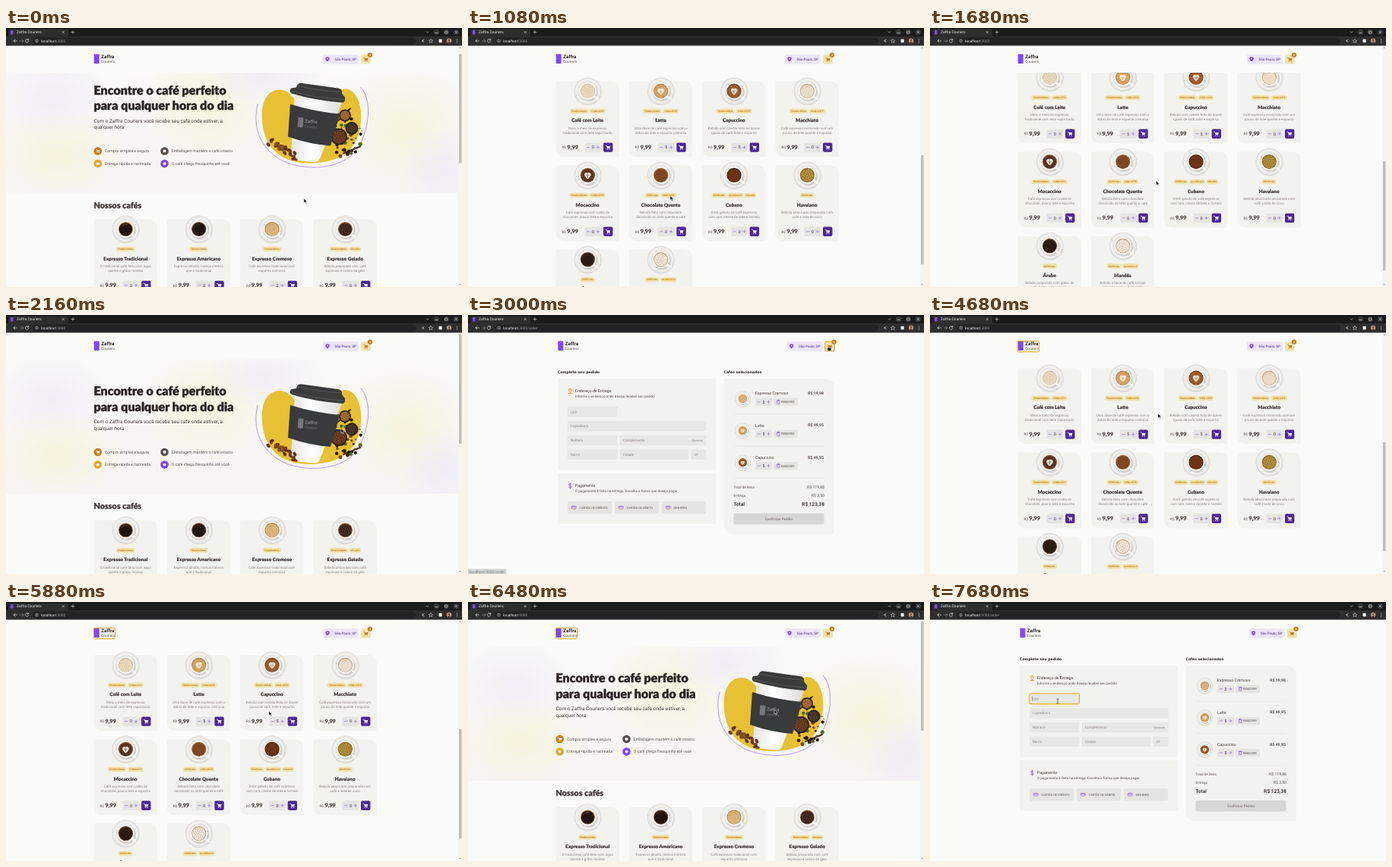
These frames come from a looping animation (600x342 px, 8 s). An HTML page:

```html
<!DOCTYPE html>
<html lang="pt">
<head>
<meta charset="utf-8">
<title>Zaffra Couriers</title>
<style>
html, body { margin: 0; width: 100%; height: 100%; overflow: hidden; background: #fafaf8; }
svg { display: block; width: 600px; height: 342px; font-family: Roboto, sans-serif; text-rendering: geometricPrecision; }
text { white-space: pre; }
.title { font-family: Lato, sans-serif; font-weight: 900; stroke: currentColor; stroke-width: .025em; }
.head { font-family: 'DejaVu Sans', sans-serif; font-weight: 700; }
.bold { font-weight: 700; }
.mid { text-anchor: middle; }
.end { text-anchor: end; }
</style>
</head>
<body>
<svg id="stage" viewBox="0 0 600 342"></svg>
<script>
const PURPLE = '#8047f8', DEEP = '#4b2995', GOLD = '#dbac2c', AMBER = '#c47f17';
const INK = '#272221', BODY = '#574f4d', SOFT = '#8d8686', PANEL = '#f2f2ee', FIELD = '#e7e7e3';

const text = (x, y, size, fill, str, cls = '') =>
  `<text x="${x}" y="${y}" font-size="${size}" fill="${fill}" color="${fill}" class="${cls}">${str}</text>`;
const rect = (x, y, w, h, fill, r = 0, more = '') =>
  `<rect x="${x}" y="${y}" width="${w}" height="${h}" rx="${r}" fill="${fill}" ${more}/>`;
const circle = (x, y, r, fill, more = '') => `<circle cx="${x}" cy="${y}" r="${r}" fill="${fill}" ${more}/>`;
const path = (d, fill, more = '') => `<path d="${d}" fill="${fill}" ${more}/>`;
const line = (d, color, w = .6, more = '') =>
  path(d, 'none', `stroke="${color}" stroke-width="${w}" stroke-linecap="round" stroke-linejoin="round" ${more}`);
const group = (x, y, inner, more = '') => `<g transform="translate(${x} ${y})" ${more}>${inner}</g>`;
const times = (n, f) => Array.from({ length: n }, (_, i) => f(i)).join('');
const noise = i => (Math.sin(i * 12.9898) * 43758.5453 % 1 + 1) % 1;

// Panel with two large opposite corners
const leaf = (x, y, w, h, r) =>
  path(`M${x + 2} ${y}h${w - r - 2}q${r} 0 ${r} ${r}v${h - r - 2}q0 2 -2 2h${2 + r - w}q${-r} 0 ${-r} ${-r}v${2 + r - h}q0 -2 2 -2`, PANEL);
const cartIcon = (x, y, color) => group(x, y,
  line('M-3 -2.4h1.2l.4 1', color, .7) + path('M-1.7 -1.6h4.9l-.8 3h-3.5z', color) +
  circle(-.8, 2.4, .7, color) + circle(1.8, 2.4, .7, color));
const pinIcon = (x, y, color) => path(`M${x} ${y + 3.2}c-5 -5 -2 -6.4 0 -6.4s5 1.4 0 6.4`, color);
const counter = (x, y, h, n) => rect(x, y, 22, h, '#e4e4e1', 2) +
  line(`M${x + 3} ${y + h / 2}h3.4M${x + 15.8} ${y + h / 2}h3.4m-1.7 -1.7v3.4`, PURPLE, .55) +
  text(x + 11, y + h / 2 + 1.9, 5.2, INK, n, 'mid');

function plate(x, y, r, [coffee, crema, art]) {
  const dots = times(26, i => {
    const a = i * 2.4, d = 1.5 * Math.sqrt(i);
    return circle(d * Math.cos(a), d * Math.sin(a), .55, art, 'opacity=".75"');
  });
  const foam = path('M0 5C-7 0 -4 -5 0 -3C4 -5 7 0 0 5z', '#f6ead8') + line('M-2 0q2 2 4 0M0 -2v5', coffee, .6);
  const extra = art === 'foam' ? foam : art ? dots : path('M-6 -3q3 -4 8 -3', 'none', `stroke="${crema}" opacity=".5"`);
  return group(x, y, `<g transform="scale(${r / 18})">` +
    circle(.3, .8, 18, '#000', 'opacity=".1"') + circle(0, 0, 17.8, 'url(#china)') +
    circle(1.5, 1.8, 12, '#aeaaa3', 'opacity=".4"') + line('M8 7l5 3.5', '#f6f5f2', 2.8) +
    circle(0, 0, 11.5, '#f7f6f3') + circle(0, 0, 9.6, crema) + circle(0, .3, 8.6, coffee) + extra + '</g>');
}

const T = 'TRADICIONAL', M = 'COM LEITE', S = 'ESPECIAL', A = 'ALCOÓLICO', G = 'GELADO';
const coffees = [
  ['Expresso Tradicional', [T], 'O tradicional café feito com água', 'quente e grãos moídos', 0, ['#21130d', '#b07a45']],
  ['Expresso Americano', [T], 'Expresso diluído, menos intenso', 'que o tradicional', 0, ['#20140f', '#6d4a34']],
  ['Expresso Cremoso', [T], 'Café expresso tradicional com', 'espuma cremosa', 2, ['#d8b27a', '#b98646']],
  ['Expresso Gelado', [T, G], 'Bebida preparada com café', 'expresso e cubos de gelo', 0, ['#3a241a', '#a4713f', '#80604b']],
  ['Café com Leite', [T, M], 'Meio a meio de expresso', 'tradicional com leite vaporizado', 0, ['#e9d9bd', '#d8c4a2', '#c7aa7c']],
  ['Latte', [T, M], 'Uma dose de café expresso com o', 'dobro de leite e espuma cremosa', 5, ['#d3a262', '#b88448', 'foam']],
  ['Capuccino', [T, M], 'Bebida com canela feita de doses', 'iguais de café, leite e espuma', 5, ['#9a5b2b', '#78431d', 'foam']],
  ['Macchiato', [T, M], 'Café expresso misturado com um', 'pouco de leite quente e espuma', 0, ['#eadcc9', '#c9a884']],
  ['Mocaccino', [T, M], 'Café expresso com calda de', 'chocolate, pouco leite e espuma', 0, ['#5b3421', '#8a5b3c', 'foam']],
  ['Chocolate Quente', [S, M], 'Bebida feita com chocolate', 'dissolvido no leite quente e café', 0, ['#7c4220', '#a86a3a', '#a86a3a']],
  ['Cubano', [S, A, G], 'Drink gelado de café expresso', 'com rum, creme de leite e hortelã', 0, ['#6b3214', '#47200e', '#7d4220']],
  ['Havaiano', [S], 'Bebida adocicada preparada com', 'café e leite de coco', 0, ['#a5812f', '#8a6a2a', '#e2cd86']],
  ['Árabe', [S], 'Bebida preparada com grãos de', 'café árabe e especiarias', 0, ['#2c1b12', '#54361f']],
  ['Irlandês', [S, A], 'Bebida a base de café, uísque', 'irlandês, açúcar e chantilly', 0, ['#efe6da', '#c7a887', '#b08b6a']],
];

function tags(names) {
  const widths = names.map(n => 4 + n.length * 1.9);
  let x = 41.8 - (widths.reduce((a, b) => a + b) + 1.4 * (names.length - 1)) / 2;
  return names.map((n, i) => {
    const out = rect(x, 36.4, widths[i], 6.4, '#f1e3ae', 3.2) + text(x + widths[i] / 2, 40.8, 3.25, AMBER, n, 'bold mid');
    x += widths[i] + 1.4;
    return out;
  }).join('');
}

const card = ([name, labels, top, bottom, count, look], i) =>
  group(115.5 + 96.3 * (i % 4), 271 + 111.2 * Math.floor(i / 4),
    leaf(0, 0, 83.4, 100, 12) + plate(42, 13, 18, look) + tags(labels) +
    text(41.8, 54.3, 6.3, '#403937', name, 'title mid') +
    text(41.8, 63.6, 4.55, SOFT, top, 'mid') + text(41.8, 69.6, 4.55, SOFT, bottom, 'mid') +
    text(8, 89.2, 4.55, BODY, 'R$') + text(15, 89.6, 7.3, BODY, '9,99', 'title') +
    counter(38, 81.2, 12.4, count) + rect(62.6, 81.2, 12.4, 12.4, DEEP, 2) + cartIcon(68.6, 87.4, '#fff'));

const feature = (x, y, color, label) => circle(x, y, 5.3, color) +
  (label[0] === 'C' ? group(x, y, `<g transform="scale(.8)">${cartIcon(0, 0, '#fff')}</g>`) : rect(x - 1.8, y - 1.7, 3.6, 3.4, '#fff', 1)) +
  text(x + 9.2, y + 1.8, 5.15, BODY, label);

const bean = i => {
  const u = noise(i + 1), x = 343 + 38 * u, y = 161 + 22 * u + 11 * noise(i + 40);
  return `<g transform="translate(${x} ${y}) rotate(${i * 47})"><ellipse rx="3" ry="2.1" fill="${i % 2 ? '#6b3a17' : '#8f5523'}"/>` +
    line('M-2.400 0q2.400 -.8 4.800 0', '#3d1f0b', .5) + '</g>';
};
const bowl = (x, y, r, color, speck) => circle(x, y, r, '#2b211b') + circle(x, y, r - 1.6, color) +
  times(24, i => circle(x + Math.cos(i * 2.4) * Math.sqrt(i) * r * .15, y + Math.sin(i * 2.4) * Math.sqrt(i) * r * .15, .8, speck));
const spice = i => {
  const a = i * 2.4, d = Math.sqrt(noise(i + 7));
  return circle(446 + 23 * d * Math.cos(a), 157 + 32 * d * Math.sin(a), .8 + 1.8 * noise(i + 90),
    ['#33200f', '#4f6b22', '#6b4423', '#241a12'][i % 4]);
};

const heroArt =
  line('M331 119C324 150 334 178 364 194C400 210 450 204 466 172C480 143 480 111 467 97', PURPLE, .55) +
  path('M337 140C335 112 347 99 361 100C378 101 382 124 402 124C424 124 430 99 447 99C467 101 472 136 463 161C453 189 427 197 399 197C360 197 339 175 337 140z', '#e8c033') +
  line('M437 141l16 -16M444 184l22 -9', '#4a2f1a', 2) + times(60, spice) +
  bowl(446, 134, 8, '#8a5527', '#bb8142') + bowl(455, 151, 8.5, '#3a2a20', '#6b4a30') + bowl(438, 162, 11, '#5b3518', '#87552d') +
  path('M380 104L443 115L413 191Q411 196 404 195.500L380 193Q375 192 375 186z', 'url(#paper)') +
  path('M374 119Q406 129 439.500 132L427 174Q399 172 371 162z', '#393a3b') +
  path('M382 97Q383 90.500 390 91.500L437 98Q443 99 442 105L446 110Q447 116 443 117Q405 114 376 105Q372 103 375 98z', '#3b3b3c') +
  line('M376 102Q407 111 445 113M384 95Q410 101 440 103', '#5a5a5b', .9) + times(22, bean) +
  `<g transform="rotate(4 394 145)">` + rect(384, 137, 7, 13, '#77777a', 1) +
  text(393, 143.500, 6, '#88888b', 'Zaffra', 'bold') + text(393, 150, 4.5, '#77777a', 'Couriers') + '</g>';

const glow = (x, y, rx, ry, id) => `<ellipse cx="${x}" cy="${y}" rx="${rx}" ry="${ry}" fill="url(#${id})"/>`;
const home = `<g id="content">` +
  `<g clip-path="url(#band)">` + rect(0, 24, 596, 212, 'url(#wash)') +
  glow(60, 110, 75, 60, 'lilac') + glow(70, 185, 90, 60, 'lemon') + glow(265, 120, 90, 80, 'lemon') +
  glow(340, 80, 80, 50, 'lilac') + glow(525, 150, 95, 85, 'lemon') + glow(575, 205, 60, 60, 'lilac') + '</g>' +
  text(115.5, 106.4, 16.1, INK, 'Encontre o café perfeito', 'title') +
  text(115.5, 126.8, 16.1, INK, 'para qualquer hora do dia', 'title') +
  text(115.5, 143.4, 6.5, '#403937', 'Com o Zaffra Couriers você recebe seu café onde estiver, a') +
  text(115.5, 151.8, 6.5, '#403937', 'qualquer hora') +
  feature(120.8, 181, AMBER, 'Compra simples e segura') + feature(208.6, 181, BODY, 'Embalagem mantém o café intacto') +
  feature(120.8, 197.6, GOLD, 'Entrega rápida e rastreada') + feature(208.6, 197.6, PURPLE, 'O café chega fresquinho até você') +
  heroArt + text(115.5, 256, 10.8, '#403937', 'Nossos cafés', 'title') + coffees.map(card).join('') + '</g>' +
  rect(595, 23, 5, 319, '#f4f4f3') + path('M596.500 26.500l1 -1.300l1 1.300zM596.500 338l1 1.300l1 -1.300z', '#777') +
  `<rect id="thumb" x="596" width="3.4" height="144" fill="#bdbdbc"/>`;

const field = (x, y, w, label) => rect(x, y, w, 13.6, FIELD, 1.5) + text(x + 4, y + 8.5, 4.55, SOFT, label);
const pay = (x, label) => rect(x, 246, 58, 16.5, '#e4e4e1', 2) + rect(x + 5.6, 252.3, 5.4, 3.8, 'none', .5, `stroke="${PURPLE}" stroke-width=".6"`) +
  line(`M${x + 5.6} 253.700h5.400`, PURPLE) + text(x + 15.6, 255.7, 3.9, BODY, label);
const item = (i, name, price) => {
  const [, , , , count, look] = coffees.find(c => c[0] === name);
  return group(0, i * 42.2, plate(361.5, 110.5, 10.5, look) + text(378, 105.4, 5.2, '#403937', name) +
    text(468, 105.2, 5.2, BODY, price, 'bold end') + counter(378, 109.6, 10.4, count) + rect(402, 109.6, 32, 10.4, '#e4e4e1', 2) +
    line('M406.300 113h4m-3.500 0v4.200h3v-4.200m-2.200 0v-.800h1.400v.800', PURPLE, .6) + text(412, 116.2, 3.9, BODY, 'REMOVER') +
    line('M349.500 131.300h119', '#e2e1de', .5));
};
const sumRow = (y, label, value, size, valueSize, cls = '') =>
  text(349.5, y, size, cls ? '#403937' : BODY, label, cls) + text(469, y, valueSize, cls ? '#403937' : BODY, value, cls + ' end');

const order =
  text(118, 77, 4.65, INK, 'Complete seu pedido', 'head') + text(336.5, 77, 4.65, INK, 'Cafés selecionados', 'head') +
  rect(118, 84, 208.3, 120.5, PANEL, 2) + rect(118, 209, 208.3, 66.6, PANEL, 2) + leaf(336.5, 84, 145.5, 205.5, 14) +
  line('M134.500 102.500c-4 -4 -2 -5.300 0 -5.300s4 1.300 0 5.300m-2.500 1h5', AMBER, .7) + circle(134.5, 99, .8, AMBER) +
  text(141, 102.3, 5.2, '#403937', 'Endereço de Entrega') + text(141, 109.2, 4.55, BODY, 'Informe o endereço onde deseja receber seu pedido') +
  field(131, 121, 65.5, 'CEP') + field(131, 139.8, 182.6, 'Logradouro') + field(131, 158.7, 65.5, 'Número') +
  field(200, 158.7, 113.6, 'Complemento') + `<g font-style="italic">${text(309, 166.7, 3.9, SOFT, 'Opcional', 'end')}</g>` +
  field(131, 177.5, 65.5, 'Bairro') + field(200, 177.5, 90, 'Cidade') + field(293.6, 177.5, 20, 'UF') +
  line('M136.300 224q-.300 -1 -1.800 -1q-1.900 0 -1.900 1.300t1.900 1.300t1.900 1.300t-1.900 1.300q-1.600 0 -1.900 -1.100m1.900 -5.300v7.400', PURPLE, .7) +
  text(141, 227.3, 5.2, '#403937', 'Pagamento') +
  text(141, 234, 4.55, BODY, 'O pagamento é feito na entrega. Escolha a forma que deseja pagar') +
  pay(131, 'CARTÃO DE CRÉDITO') + pay(193, 'CARTÃO DE DÉBITO') + pay(255, 'DINHEIRO') +
  item(0, 'Expresso Cremoso', 'R$ 19,98') + item(1, 'Latte', 'R$ 49,95') + item(2, 'Capuccino', 'R$ 49,95') +
  sumRow(229.2, 'Total de itens', 'R$ 119,88', 4.55, 5.2) + sumRow(240, 'Entrega', 'R$ 3,50', 4.55, 5.2) +
  sumRow(251.8, 'Total', 'R$ 123,38', 6.5, 6.5, 'bold') +
  rect(349.5, 262, 119, 14.6, '#d6d6d2', 2) + text(409, 270.9, 4.55, SOFT, 'Confirmar Pedido', 'bold mid');

const header = rect(0, 23, 595, 36, '#fafaf8') + `<g id="bar">` +
  rect(115.8, 34.5, 7, 12.5, PURPLE, 1) +
  text(125.2, 40.4, 6.3, INK, 'Zaffra', 'bold') + text(125.2, 46.4, 4.8, BODY, 'Couriers') +
  rect(417, 35.2, 46.6, 12.4, '#ebe5f9', 2) + pinIcon(423, 41.4, PURPLE) + circle(423, 40.4, .9, '#ebe5f9') +
  text(432.5, 43.1, 4.6, DEEP, 'São Paulo, SP') +
  rect(467, 35.2, 12.8, 12.4, '#f1e3ae', 2) + cartIcon(473.3, 41.5, AMBER) +
  circle(479, 35.6, 3.2, AMBER) + text(479, 36.9, 3.7, '#fff', '3', 'bold mid') + '</g>';

const ICON = '#e2e2e2';
const browser = rect(0, 0, 600, 12, '#1b1b1c') + path('M1 12q2 0 2 -2v-6q0 -2.500 2.500 -2.500h74q2.500 0 2.500 2.500v6q0 2 2 2z', '#2e2e2f') +
  rect(0, 11, 600, 12.4, '#2e2e2f') + rect(35, 12.4, 505, 9.4, '#232324', 4.7) + rect(6, 3, 3.6, 5.4, PURPLE, .6) +
  text(14, 7.2, 4.9, '#f0f0f0', 'Zaffra Couriers') +
  line('M74 4.300l2.500 2.500m0 -2.500l-2.500 2.500M86 5.500h4m-2 -2v4', ICON, .6) +
  line('M14.500 17h-4.500m2 -2l-2 2l2 2', ICON, .7) + line('M18.500 17h4.500m-2 -2l2 2l-2 2', '#858585', .7) +
  line('M29.500 15.700a2.200 2.200 0 1 0 .300 1.800m-.100 -3v1.500h-1.500', ICON, .7) +
  circle(40.5, 17, 1.9, 'none', `stroke="${ICON}" stroke-width=".5"`) + line('M40.500 17v.9m0 -1.900v.1', ICON, .5) +
  text(46, 18.8, 4.9, '#f4f4f4', 'localhost<tspan fill="#9a9a9a" id="url"></tspan>') +
  line('M550 15.500l-2.500 1.500l2.500 1.500', ICON, .8) + path('M559 14.300l.8 1.900l2 .1l-1.600 1.300l.6 2l-1.800 -1.100l-1.800 1.100l.6 -2l-1.600 -1.300l2 -.1z', 'none', `stroke="${ICON}" stroke-width=".5"`) +
  rect(569.5, 14.8, 4.2, 4.4, '#eee', .6) + circle(583, 17, 3.2, '#b39a87') + circle(583, 16, 1.1, '#4a3a34') + path('M580.800 19.300q2.200 -3 4.400 0q-2.200 1.600 -4.400 0', '#4a3a34') +
  times(3, i => circle(593.5, 15 + i * 2, .6, ICON)) +
  line('M553 4.800l1.500 1.500l1.500 -1.500', ICON) + times(3, i => circle(566.5 + i * 12.9, 5.5, 3.6, '#3b3b3c')) +
  line('M565 6.500h3M578 4.200h2.800v2.800h-2.800zM591 4.200l2.600 2.600m0 -2.600l-2.600 2.600', ICON);

const outline = 'stroke="#fff" stroke-width=".5" stroke-linejoin="round"';
const cursors = {
  arrow: path('M0 0v6l1.400 -1.200l1 2.200l1 -.4l-1 -2.200h1.900z', '#111', outline),
  hand: path('M-.6 -1.500q.6 -.8 1.200 0v2.500l2.800 .6q.8 .3 .6 1.300l-.5 2.400h-3.600l-2 -2.700q.2 -1 1.500 0z', '#111', outline),
  beam: line('M-1.200 -3q1.200 0 1.200 .700q0 -.700 1.200 -.700M0 -2.300v4.600M-1.200 3q1.200 0 1.200 -.700q0 .700 1.200 .700', '#222', .6),
};

const radial = (id, color, alpha) => `<radialGradient id="${id}"><stop stop-color="${color}" stop-opacity="${alpha}"/><stop offset="1" stop-color="${color}" stop-opacity="0"/></radialGradient>`;
const $ = id => document.getElementById(id);
$('stage').innerHTML = '<defs>' + radial('lilac', '#ebe7f6', .65) + radial('lemon', '#f6f0d2', .7) +
  '<radialGradient id="china"><stop offset=".6" stop-color="#e2e0db"/><stop offset=".85" stop-color="#f4f3f0"/><stop offset="1" stop-color="#dad8d3"/></radialGradient>' +
  '<linearGradient id="paper"><stop stop-color="#e4e4e4"/><stop offset=".4" stop-color="#fff"/><stop offset="1" stop-color="#dcdcdc"/></linearGradient>' +
  '<linearGradient id="wash" x2="0" y2="1"><stop stop-color="#fafaf8"/><stop offset="1" stop-color="#f6f5f4"/></linearGradient>' +
  `<clipPath id="band">${rect(0, 24, 596, 212, '#000')}</clipPath></defs>` +
  rect(0, 0, 600, 342, '#fafaf8') + `<g id="home">${home}</g><g id="order">${order}</g>` + header +
  `<rect id="focus" rx="1.5" fill="none" stroke="#dda520" stroke-width="1"/>` +
  `<g id="caret">${line('M134.700 125v5.500', INK, .4)}</g>` + browser +
  `<g id="status">${rect(-2, 335.2, 0, 9, '#d3d3d1', 1.5, 'id="bubble"')}<text id="link" x="1.5" y="340.5" font-size="5" fill="#858585"></text></g>` +
  `<g id="cursor">${Object.entries(cursors).map(([k, v]) => `<g id="${k}">${v}</g>`).join('')}</g>`;

const ease = k => k * k * (3 - 2 * k);
function along(keys, t) {
  const i = keys.findIndex(k => k[0] > t);
  if (i < 0) return keys[keys.length - 1].slice(1);
  const [a, b] = [keys[i - 1], keys[i]], k = ease((t - a[0]) / (b[0] - a[0]));
  return a.slice(1).map((v, j) => v + (b[j + 1] - v) * k);
}
const scrollKeys = [[0, 18.5], [720, 312], [1080, 312], [1440, 381], [1800, 312], [2160, 0], [4320, 0], [4680, 312],
  [4920, 312], [5280, 381], [5640, 312], [5880, 312], [6240, 0]];
const cursorKeys = [[0, 392, 225], [960, 275, 222], [1080, 266, 221.5], [1800, 300, 200], [2160, 441, 150], [2760, 474, 42],
  [3360, 474, 42], [4080, 139, 42], [4320, 139, 42], [4680, 300, 130], [5640, 340, 150], [5880, 346, 144], [6480, 403, 142],
  [6720, 474, 42], [6960, 474, 42], [7320, 190, 127], [7440, 168, 131]];
const show = (id, on) => $(id).setAttribute('visibility', on ? 'visible' : 'hidden');
const set = (id, attrs) => Object.entries(attrs).forEach(([k, v]) => $(id).setAttribute(k, v));

function draw(now) {
  const t = Math.min(7680, Math.floor(now % 8000 / 120) * 120);
  const ordering = t >= 3000 && t < 4320 || t >= 6960;
  const shift = ordering ? 2.6 : 0;
  const [scroll] = along(scrollKeys, t), [x, y] = along(cursorKeys, t);

  show('home', !ordering);
  show('order', ordering);
  set('content', { transform: `translate(0 ${-scroll})` });
  set('thumb', { y: 26 + scroll * .455 });
  set('bar', { transform: `translate(${shift} 0)` });
  $('url').textContent = ordering ? ':3000/order' : ':3000';

  const boxes = { cart: [467 + shift, 35.2, 12.8, 12.4], logo: [115.2 + shift, 34.3, 28.4, 14.4], cep: [130.8, 120.9, 65.8, 13.8] };
  const focus = t < 2880 ? '' : t < 4200 ? 'cart' : t < 6840 ? 'logo' : t < 7680 ? 'cart' : 'cep';
  show('focus', focus);
  if (focus) {
    const [fx, fy, width, height] = boxes[focus];
    set('focus', { x: fx, y: fy, width, height });
  }
  show('caret', focus === 'cep');

  const over = name => {
    const [bx, by, w, h] = boxes[name];
    return x > bx && x < bx + w && y > by && y < by + h;
  };
  const link = over('cart') ? 'localhost:3000/order' : over('logo') ? 'localhost:3000' : '';
  show('status', link);
  $('link').textContent = link;
  set('bubble', { width: 4 + link.length * 2.42 });
  const kind = link ? 'hand' : ordering && over('cep') ? 'beam' : 'arrow';
  Object.keys(cursors).forEach(k => show(k, k === kind));
  set('cursor', { transform: `translate(${x} ${y})` });
  requestAnimationFrame(draw);
}
requestAnimationFrame(draw);
</script>
</body>
</html>
```
